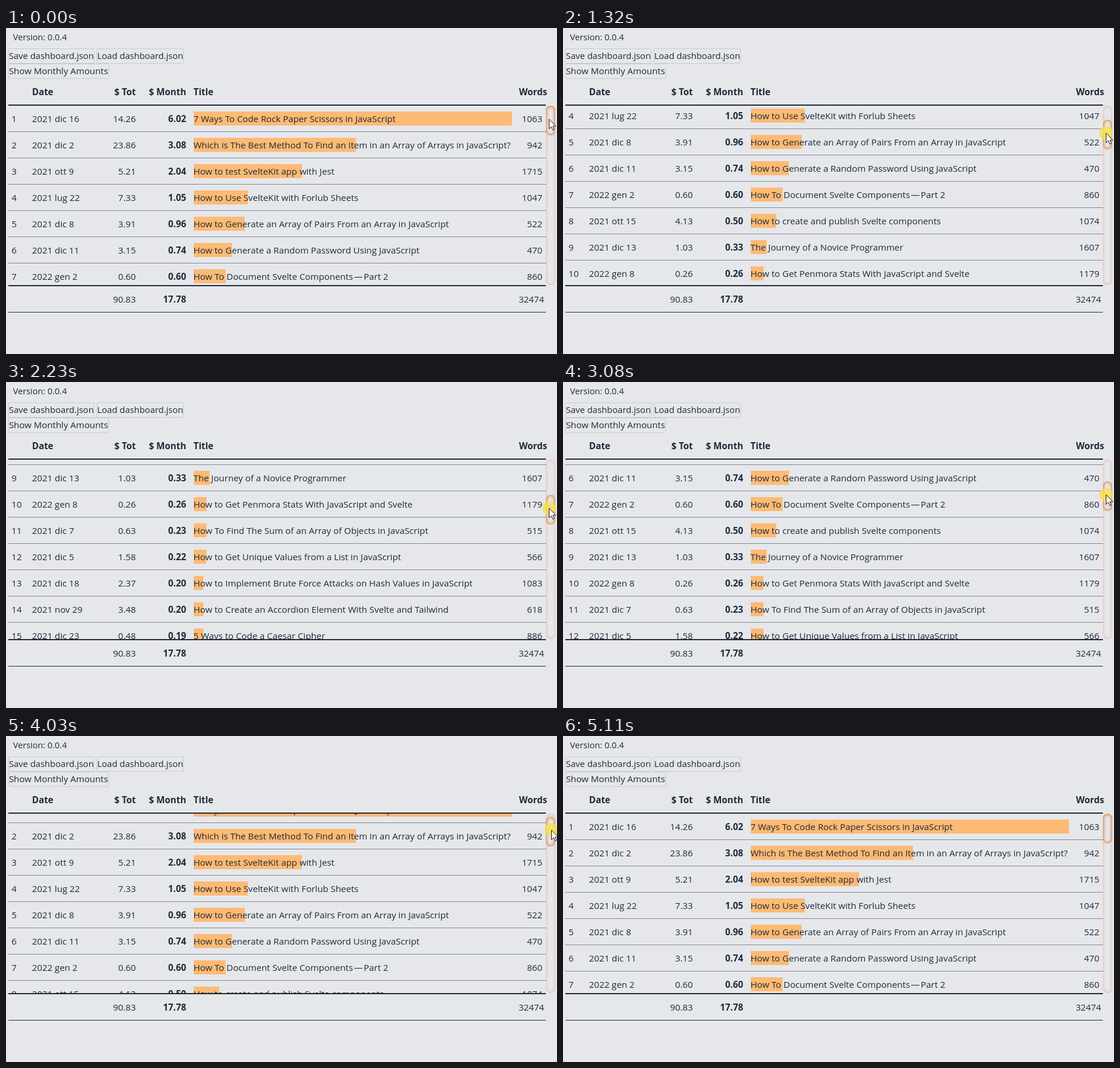
Recreate the animation shown at these times as an HTML page. Size 942 by 558 pixels, loop 5610 ms.

```html
<!DOCTYPE html>
<html lang="en">
<head>
<meta charset="utf-8">
<title>Dashboard</title>
<style>
html, body { margin: 0; width: 100%; height: 100%; overflow: hidden; background: #e5e7eb; }
#stage { position: relative; width: 942px; height: 558px; overflow: hidden; }
svg { position: absolute; left: 0; top: 0; }
text { font: 15.25px "Open Sans", "Noto Sans", sans-serif; fill: #1f2937; white-space: pre; }
.b { font-weight: 700; font-size: 15.4px; }
.end { text-anchor: end; }
.bar { position: absolute; left: 923px; top: 133px; width: 16px; border-radius: 8px; }
#track { height: 307px; box-shadow: inset 0 0 5px #f0a98c; }
#thumb { height: 51px; box-shadow: inset 0 0 5px 1px #d9803f; }
</style>
</head>
<body>
<div id="stage">
  <div id="track" class="bar"></div>
  <div id="thumb" class="bar"></div>
  <svg width="942" height="558" viewBox="0 0 942 558">
    <clipPath id="view"><rect x="0" y="133" width="923" height="307"/></clipPath>
    <g id="fixed"></g>
    <g clip-path="url(#view)"><g id="rows"></g></g>
    <g fill="#1f2937">
      <rect x="4" y="131" width="919" height="2"/>
      <rect x="4" y="440" width="919" height="2"/>
      <rect x="4" y="486" width="919" height="1"/>
    </g>
    <g id="cursor">
      <circle id="press" r="11.5" fill="#f8e148" opacity=".8"/>
      <path d="M0 0V16.5L3.8 13 6.3 18.7 8.8 17.6 6.4 12H11.6Z" fill="#fff" stroke="#111" stroke-width="1"/>
    </g>
  </svg>
</div>
<script>
const LOOP = 5610, PITCH = 45, RATIO = 5.846;
const $ = id => document.getElementById(id);

function add(parent, tag, attrs, content) {
  const el = document.createElementNS("http://www.w3.org/2000/svg", tag);
  for (const k in attrs) el.setAttribute(k, attrs[k]);
  if (content !== undefined) el.textContent = content;
  parent.appendChild(el);
  return el;
}
const label = (g, x, y, str, cls = "") => add(g, "text", { x, y, class: cls }, str);

// date | total | month | title | words
const data = `2021 dic 16|14.26|6.02|7 Ways To Code Rock Paper Scissors in JavaScript|1063
2021 dic 2|23.86|3.08|Which is The Best Method To Find an Item in an Array of Arrays in JavaScript?|942
2021 ott 9|5.21|2.04|How to test SvelteKit app with Jest|1715
2021 lug 22|7.33|1.05|How to Use SvelteKit with Forlub Sheets|1047
2021 dic 8|3.91|0.96|How to Generate an Array of Pairs From an Array in JavaScript|522
2021 dic 11|3.15|0.74|How to Generate a Random Password Using JavaScript|470
2022 gen 2|0.60|0.60|How To Document Svelte Components\u200a—\u200aPart 2|860
2021 ott 15|4.13|0.50|How to create and publish Svelte components|1074
2021 dic 13|1.03|0.33|The Journey of a Novice Programmer|1607
2022 gen 8|0.26|0.26|How to Get Penmora Stats With JavaScript and Svelte|1179
2021 dic 7|0.63|0.23|How To Find The Sum of an Array of Objects in JavaScript|515
2021 dic 5|1.58|0.22|How to Get Unique Values from a List in JavaScript|566
2021 dic 18|2.37|0.20|How to Implement Brute Force Attacks on Hash Values in JavaScript|1083
2021 nov 29|3.48|0.20|How to Create an Accordion Element With Svelte and Tailwind|618
2021 dic 23|0.48|0.19|5 Ways to Code a Caesar Cipher|886`.split("\n").map(r => r.split("|"));

data.forEach(([date, tot, month, title, words], i) => {
  const g = $("rows"), y = 161 + i * PITCH;
  const pct = Math.round(month / data[0][2] * 100);
  add(g, "rect", { x: 321, y: y - 18, width: 5.44 * pct, height: 24, fill: "#fdba74" });
  add(g, "path", { d: `M4 ${y + 16.5}H923`, stroke: "#1f2937", "stroke-dasharray": "1 1" });
  label(g, 9.5, y, i + 1);
  label(g, 44.5, y, date);
  label(g, 222, y, tot, "end");
  label(g, 308, y, month, "b end");
  label(g, 320.5, y, title);
  label(g, 917, y, words, "end");
});

const fixed = $("fixed");
function button(x, y, w, str, size) {
  add(fixed, "rect", { x: x + .5, y: y + .5, width: w - 1, height: 25, rx: 1, fill: "none", stroke: "#c8cacd" });
  label(fixed, x + 1, y + 18, str).style.fontSize = size + "px";
}
label(fixed, 12, 21, "Version: 0.0.4").style.fontSize = "14.7px";
button(4, 35, 147, "Save dashboard.json", 15);
button(155, 35, 149, "Load dashboard.json", 15);
button(4, 61, 172, "Show Monthly Amounts", 15.25);
label(fixed, 44.5, 115, "Date", "b");
label(fixed, 222, 115, "$ Tot", "b end");
label(fixed, 308, 115, "$ Month", "b end");
label(fixed, 320.5, 115, "Title", "b");
label(fixed, 877, 115, "Words", "b");
label(fixed, 222, 470, "90.83", "end");
label(fixed, 308, 470, "17.78", "b end");
label(fixed, 920, 470, "32474", "end");

// The picture advances in discrete steps: [first, last, count]
const stops = [0];
for (const [a, b, n] of [[740, 1240, 7], [1320, 1580, 4], [1740, 2230, 7], [2580, 3080, 7],
  [3170, 3690, 7], [3770, 4280, 7], [4370, 4860, 7], [4940, 5110, 3]])
  for (let i = 0; i < n; i++) stops.push(Math.floor((a + (b - a) * i / (n - 1)) / 10) * 10);

// Pointer path: [time, x, y]
const path = [[740, 929, 156], [1320, 929, 180], [1580, 929, 190], [1660, 929, 190], [2230, 929, 216],
  [2500, 929, 216], [3080, 929, 193], [3170, 929, 190], [4030, 933, 161], [4110, 933, 156],
  [4280, 932, 147], [4450, 930, 136], [4860, 862, 403], [4940, 846, 445], [5030, 805, 490]];

function pointer(t) {
  const i = path.findIndex(p => p[0] >= t);
  if (i < 0) return path[path.length - 1].slice(1);
  if (i === 0) return path[0].slice(1);
  const [a, b] = [path[i - 1], path[i]], k = (t - a[0]) / (b[0] - a[0]);
  return [1, 2].map(j => Math.round(a[j] + (b[j] - a[j]) * k));
}

function draw(time) {
  const t = stops.filter(s => s <= time).pop();
  const [x, y] = pointer(t);
  const drag = t < 4450 ? Math.max(0, y - 156) : 0;
  $("rows").setAttribute("transform", `translate(0 ${-Math.round(drag * RATIO)})`);
  $("thumb").style.top = 133 + drag + "px";
  $("cursor").setAttribute("transform", `translate(${x - .5} ${y})`);
  $("cursor").style.display = t < 5110 ? "" : "none";
  $("press").style.display = t >= 740 && t < 4450 ? "" : "none";
}

const start = performance.now();
function tick() {
  draw((performance.now() - start) % LOOP);
  requestAnimationFrame(tick);
}
tick();
</script>
</body>
</html>
```
